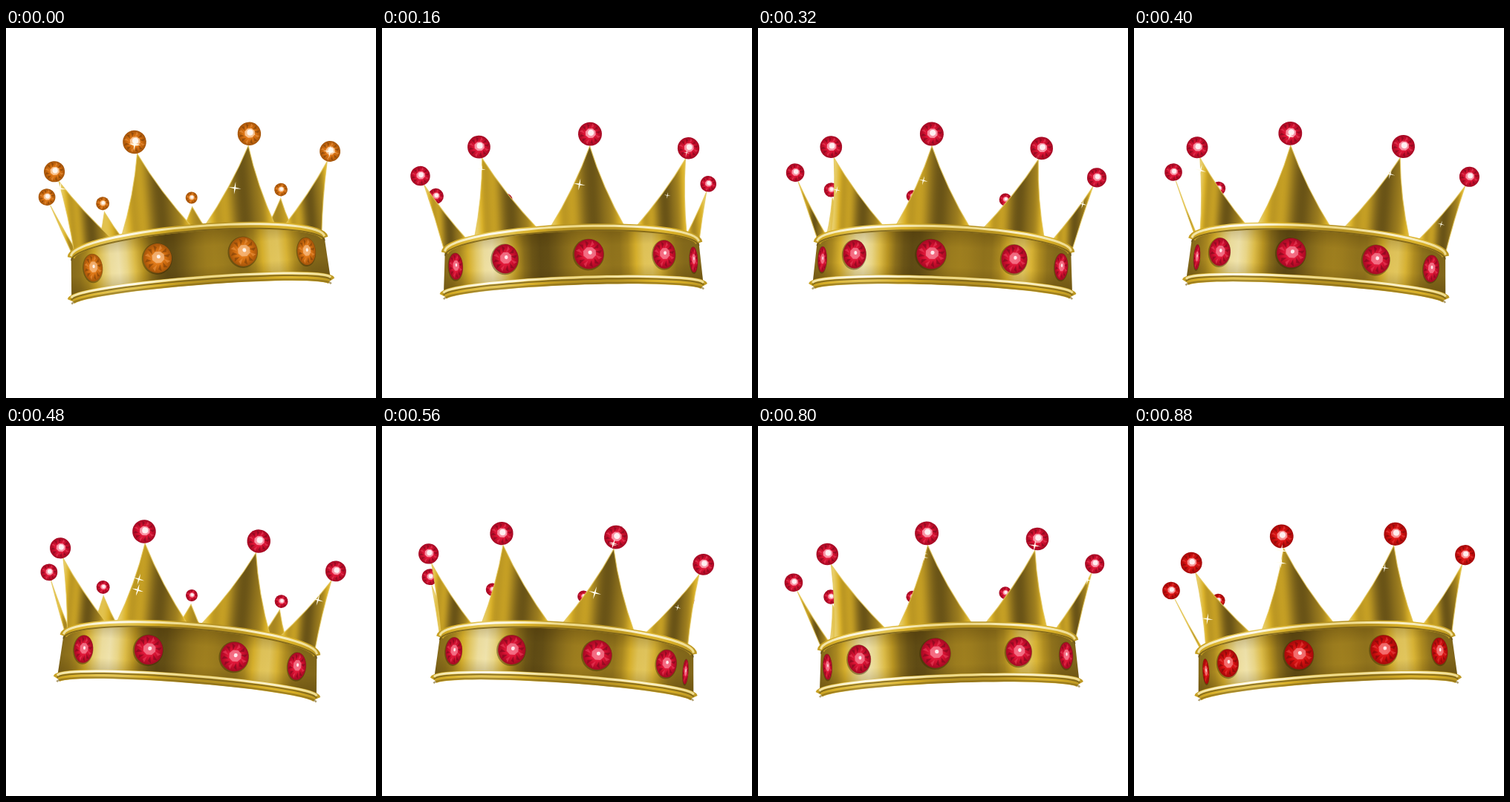
Animation of 498 by 498 pixels, one loop 960 ms. Source, as an HTML page with a canvas:

```html
<!DOCTYPE html>
<html lang="en">
<head>
<meta charset="utf-8">
<title>Turning crown</title>
<style>
html, body { margin: 0; width: 100%; height: 100%; overflow: hidden; background: #fff; }
canvas { display: block; }
</style>
</head>
<body>
<canvas id="stage" width="498" height="498"></canvas>
<script>
const ctx = document.getElementById('stage').getContext('2d');
const STEP = 80, STEPS = 12, POINTS = 8, SPACING = 40, SPAN = POINTS * SPACING;
const rad = deg => deg * Math.PI / 180;
const sin = deg => Math.sin(rad(deg)), cos = deg => Math.cos(rad(deg));
const mix = (p, q, t) => [p[0] + (q[0] - p[0]) * t, p[1] + (q[1] - p[1]) * t];
const clamp01 = v => Math.min(1, Math.max(0, v));
const bump = (u, at, width) => Math.exp(-(((u - at) / width) ** 2));
const random = seed => {
  const v = Math.sin(seed * 12.9898) * 43758.5453;
  return v - Math.floor(v);
};

// All crown positions are relative to the pivot it rocks about.
const topRim = a => [171 * sin(a), 66 - 27 * cos(a)];
const lowRim = a => [175 * sin(a), 123 - 14 * cos(a)];
const tip = a => {
  const c = cos(a);
  return [203 * sin(a) / (1 - .11 * c), -24 - 42.6 * c - 20.4 * c * c];
};

const gold = (light, alpha = 1) => `hsla(${42 + light / 12}, ${60 + light / 5}%, ${light}%, ${alpha})`;

// Horizontal gold gradient whose lightness follows a function of 0..1.
function metal(x0, x1, lightness) {
  const g = ctx.createLinearGradient(x0, 0, x1, 0);
  for (let u = 0; u <= 1; u += 1 / 32) g.addColorStop(u, gold(lightness(u)));
  return g;
}
const bandLight = u => 31 + 52 * bump(u, .18, .09) + 34 * bump(u, .8, .07) + 7 * bump(u, .56, .1) - 9 * bump(u, .38, .08);
const rimLight = u => 42 + 20 * bump(u, .2, .16) + 10 * bump(u, .85, .12);
const glossLight = u => 72 + 24 * bump(u, .2, .18) + 16 * bump(u, .8, .15);
const spikeLight = u => 36 + 32 * bump(u, 0, .14) + 10 * bump(u, .32, .12) - 11 * bump(u, .58, .15) + 20 * bump(u, 1, .12);

function disc(x, y, r, fill) {
  ctx.fillStyle = fill;
  ctx.beginPath();
  ctx.arc(x, y, r, 0, 7);
  ctx.fill();
}

function gem([x, y], rx, ry, hue, inBand) {
  const tone = light => `hsl(${hue}, 88%, ${light}%)`;
  ctx.save();
  ctx.translate(x, y);
  ctx.scale(rx, ry);
  if (inBand) disc(-.04, .04, 1.07, 'rgba(60,38,0,.45)');
  const glow = ctx.createRadialGradient(0, 0, .2, 0, 0, 1);
  glow.addColorStop(0, tone(54));
  glow.addColorStop(.6, tone(42));
  glow.addColorStop(1, tone(34));
  disc(0, 0, 1, glow);
  for (let i = 0; i < 12; i++) {
    const a = i * 30 + 10, bright = i % 3 === 0;
    ctx.globalAlpha = .5;
    ctx.fillStyle = tone(bright ? 62 : 22);
    ctx.beginPath();
    ctx.moveTo(.45 * cos(a), .45 * sin(a));
    ctx.lineTo(.92 * cos(a + 6), .92 * sin(a + 6));
    ctx.lineTo(.75 * cos(a + 20), .75 * sin(a + 20));
    ctx.fill();
  }
  ctx.globalAlpha = inBand ? .6 : .9;
  ctx.fillStyle = tone(80);
  ctx.beginPath();
  for (let i = 0; i < 8; i++) ctx.lineTo(.46 * cos(i * 45 + 22) + .05, .42 * sin(i * 45 + 22) - .06);
  ctx.fill();
  ctx.globalAlpha = .85;
  disc(.08, -.1, inBand ? .13 : .26, '#fff');
  ctx.restore();
}

function spike(a) {
  const mid = topRim(a), left = topRim(a - 17.5), right = topRim(a + 17.5);
  const apex = mix(tip(a), mid, .13);
  const bend = side => mix(mix(side, apex, .5), mix(mid, apex, .5), .28);
  ctx.beginPath();
  ctx.moveTo(...left);
  ctx.quadraticCurveTo(...bend(left), ...apex);
  ctx.quadraticCurveTo(...bend(right), ...right);
  ctx.lineTo(mid[0], mid[1] + 6);
  ctx.closePath();
  const xs = [left[0], right[0], apex[0]];
  const lift = cos(a) < 0 ? 14 : 0;
  ctx.fillStyle = metal(Math.min(...xs), Math.max(...xs), u => spikeLight(u) + lift);
  ctx.fill();

  ctx.lineWidth = 1.2;
  ctx.strokeStyle = gold(62, .8);
  ctx.beginPath();
  ctx.moveTo(...left);
  ctx.quadraticCurveTo(...bend(left), ...apex);
  ctx.quadraticCurveTo(...bend(right), ...right);
  ctx.stroke();
}

function trace(rim, dy = 0, direction = 1) {
  for (let a = -90; a <= 90; a += 5) {
    const [x, y] = rim(a * direction);
    ctx.lineTo(x, y + dy);
  }
}

function line(rim, dy, width, color) {
  ctx.beginPath();
  trace(rim, dy);
  ctx.lineWidth = width;
  ctx.strokeStyle = color;
  ctx.stroke();
}

function band() {
  ctx.beginPath();
  trace(topRim);
  trace(lowRim, 0, -1);
  ctx.fillStyle = metal(-172, 172, bandLight);
  ctx.fill();
  const shade = ctx.createLinearGradient(0, 42, 0, 118);
  for (const u of [0, .3, .65, 1]) shade.addColorStop(u, `rgba(60,40,0,${1.2 * (u - .5) ** 2})`);
  ctx.fillStyle = shade;
  ctx.fill();

  line(lowRim, 1, 12, metal(-175, 175, rimLight));
  line(lowRim, 5.5, 2.5, gold(30, .6));
  line(lowRim, 0, 2, gold(26, .7));
  line(lowRim, -3, 3, metal(-175, 175, glossLight));

  line(topRim, 0, 10, metal(-171, 171, rimLight));
  line(topRim, 4, 2, gold(24, .7));
  line(topRim, -2, 3, metal(-171, 171, glossLight));
}

function glint([x, y], r) {
  ctx.fillStyle = '#fffdf0';
  ctx.beginPath();
  for (let i = 0; i < 8; i++) {
    const d = i % 2 ? r * .16 : r;
    ctx.lineTo(x + d * cos(i * 45 + 12), y + d * sin(i * 45 + 12));
  }
  ctx.fill();
}

// Points pass quickly around the far right of the ring.
const around = s => s + SPACING * clamp01((s - 74) / 27);

function draw(step) {
  const hue = step === 0 ? 29 : step === STEPS - 1 ? 0 : 350;
  const turn = 61 - step * 2 * SPACING / STEPS;
  const slots = Array.from({ length: POINTS }, (_, i) => (turn + i * SPACING + 180 + 2 * SPAN) % SPAN - 180);
  const spikes = slots.map(around).sort((p, q) => cos(p) - cos(q));

  ctx.fillStyle = '#fff';
  ctx.fillRect(0, 0, 498, 498);
  ctx.save();
  ctx.translate(253, 230);
  ctx.rotate(rad(-4.5 * cos(step * 360 / STEPS)));

  for (const a of spikes) {
    const r = 12 + 4 * cos(a);
    spike(a);
    gem(tip(a), r, r, hue, false);
  }
  band();
  for (const a of slots) {
    const c = cos(a);
    if (Math.abs(a) < 96) gem([163 * sin(a) / (1 - .04 * c), 89 - 14 * c], 5 + 15 * c, 17 + 3 * c, hue, true);
  }

  // A few sparkles on the lit side of the nearer spikes
  for (let i = 0; i < 4; i++) {
    const seed = step * 10 + i + 1;
    const a = spikes[POINTS - 1 - Math.floor(random(seed) * 4)];
    glint(mix(tip(a), topRim(a - 8), random(seed + .3) * .7), 4 + 5 * random(seed + .6));
  }
  ctx.restore();
}

function tick() {
  draw(Math.floor(performance.now() / STEP) % STEPS);
  requestAnimationFrame(tick);
}
tick();
</script>
</body>
</html>
```
